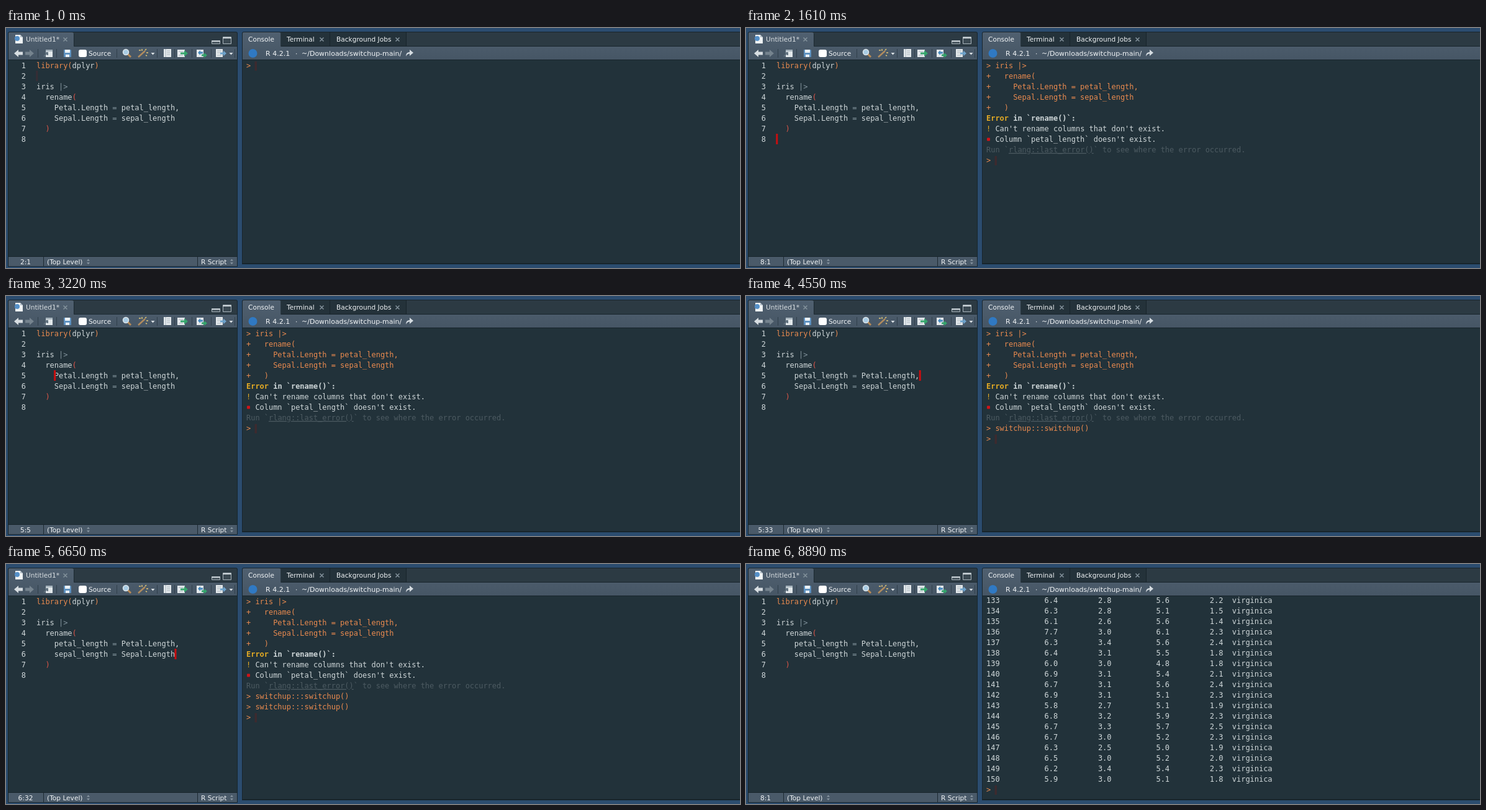
These frames come from a looping animation (1182 px wide and 388 px high, 9.24 s). An HTML page:

```html
<!DOCTYPE html>
<html lang="en">
<head>
<meta charset="utf-8">
<title>Renaming columns</title>
<style>
html, body { margin: 0; width: 100%; height: 100%; overflow: hidden; background: #2b4c6f; }
svg { display: block; }
text { white-space: pre; }
.ui { font: 10.6px "DejaVu Sans", sans-serif; fill: #f1f4f6; }
.code { font: 11.96px "DejaVu Sans Mono", monospace; fill: #cfd7d9; }
.o { fill: #e98a4f; } .r { fill: #dc5548; } .g { fill: #82939c; }
.y { fill: #e3aa24; } .d { fill: #4d5b62; } .b { font-weight: bold; }
.u { text-decoration: underline dotted; text-underline-offset: 2px; }
</style>
</head>
<body>
<svg width="1182" height="388" viewBox="0 0 1182 388">
  <defs>
    <linearGradient id="bar" x2="0" y2="1"><stop stop-color="#506070"/><stop offset="1" stop-color="#465665"/></linearGradient>
    <clipPath id="view"><path d="M381 52H1182V380H381Z"/></clipPath>
  </defs>
  <rect width="1182" height="388" fill="#2b4c6f"/>

  <!-- editor pane -->
  <path d="M3 9Q3 6 6 6H370Q373 6 373 9V386H3Z" fill="#18252c"/>
  <path d="M4 9Q4 7 6 7H370Q372 7 372 9V30H4Z" fill="#2c3a43"/>
  <path d="M4 30V9Q4 7 6 7H106Q109 7 109 10V30H372V51H4Z" fill="url(#bar)"/>
  <path d="M109.500 9V29.500H372" fill="none" stroke="#1c2a32"/>
  <path d="M4 52H372V369H4Z" fill="#22323a"/>
  <path d="M4 370H372V385H4Z" fill="#4a5a69"/>
  <path d="M60.500 370V385M308.500 370V385" stroke="#1c2a32"/>

  <!-- console pane -->
  <path d="M380 9Q380 6 383 6H1182V382H380Z" fill="#18252c"/>
  <path d="M381 9Q381 7 383 7H1182V30H381Z" fill="#2c3a43"/>
  <path d="M443 7H644V30H443Z" fill="#24323a"/>
  <path d="M521.500 7V30M644.500 7V30M443 29.500H1182" stroke="#17242b"/>
  <path d="M381 30V9Q381 7 383 7H440Q442 7 442 9V30H1182V51H381Z" fill="url(#bar)"/>
  <path d="M381 52H1182V380H381Z" fill="#22323a"/>

  <!-- tabs and labels -->
  <path d="M15 11H23L27 15V25H15Z" fill="#eef2f4"/><path d="M23 11V15H27" fill="#b2bec8"/>
  <circle cx="18" cy="17" r="4" fill="#5590c8"/>
  <g class="ui">
    <text x="32" y="22" fill-opacity=".85">Untitled1*</text>
    <text x="390" y="22">Console</text><text x="452" y="22">Terminal</text><text x="532" y="22">Background Jobs</text>
    <text x="133" y="45">Source</text>
    <text x="418" y="45" font-size="11">R 4.2.1</text><text x="466" y="45">·</text>
    <text x="476" y="45" style="font-size:11px">~/Downloads/switchup-main/</text>
    <text x="66" y="382">(Top Level)</text><text x="314" y="382">R Script</text>
    <text id="pos" x="31.500" y="382" text-anchor="middle"></text>
  </g>
  <path d="M92.500 15.500l6 6m0-6l-6 6M505.500 15.500l6 6m0-6l-6 6M627.500 15.500l6 6m0-6l-6 6" stroke="#82919b" stroke-width="1.500"/>
  <path d="M331.500 20.500h13v5h-13zM349.500 14.500h13v11h-13z" fill="#3b4952" stroke="#a9b4bb"/>
  <path d="M331 21.500h14M349 16h14" stroke="#c4ccd1" stroke-width="2"/>
  <path d="M130 376.500l2.500-3 2.500 3zM130 379l2.500 3 2.500-3zM361 376.500l2.500-3 2.500 3zM361 379l2.500 3 2.500-3z" fill="#8997a2"/>

  <!-- toolbar -->
  <path d="M51.500 34V48M81.500 34V48M178.500 34V48M243.500 34V48M271.500 34V48M299.500 34V48M330.500 34V48M368.500 34V48" stroke="#303f4b"/>
  <path d="M13 41l7-6v3.500h7v5h-7V47z" fill="#d8dee2"/>
  <path d="M45 41l-7-6v3.500h-7v5h7V47z" fill="#75838e"/>
  <path d="M64 35H75V47H64Z" fill="#e2e8eb"/><path d="M64 35H75V38H64Z" fill="#a9b6bf"/>
  <path d="M61 46l6-6m-4 0h4v4" fill="none" stroke="#60717e" stroke-width="2"/>
  <path d="M93 35H104L105 36V47H93Z" fill="#5f92c0"/><path d="M95 35H103V40H95ZM96 43H102V47H96Z" fill="#eaf1f6"/>
  <rect x="117" y="35" width="13" height="12" rx="3" fill="#fff"/>
  <path d="M196 42l5 5" stroke="#b98a55" stroke-width="3"/>
  <circle cx="193" cy="39" r="4.500" fill="#a9cce4" stroke="#dce4e8" stroke-width="1.500"/>
  <path d="M213 47L224 37" stroke="#b08b5e" stroke-width="2.500"/>
  <path d="M214 36h3M219 34v3M226 34l-2 2M226 40h3M225 44l2 1" stroke="#e2c675" stroke-width="1.500"/>
  <path d="M233.500 40h6l-3 3.500zM359.500 40h6l-3 3.500z" fill="#dce2e6"/>
  <path d="M254 34H266V47H254Z" fill="#e4e9ec"/><path d="M257 34V47M259 37H264M259 40H264M259 43H264" stroke="#a6b3bc"/>
  <path d="M276 35H288V47H276Z" fill="#e4e9ec"/><path d="M278 38H286M278 44H285" stroke="#a9b5bd"/>
  <path d="M281 39.500h6V36l6 5-6 5v-3.500h-6z" fill="#35a56c"/>
  <path d="M307 35H318V47H307Z" fill="#e4e9ec"/>
  <path d="M309 40l4-4v2.500h4v3h-4V44z" fill="#4689bd"/><path d="M315 42.500h4V40l5 4-5 4v-2.500h-4z" fill="#35a56c"/>
  <path d="M338 34H349V47H338Z" fill="#e4e9ec"/><path d="M340 37H347M340 40H345M340 44H347" stroke="#a9b5bd"/>
  <path d="M345 39.500h5V36.500l5 4.500-5 4.500v-3h-5z" fill="#6da2cb"/>
  <circle cx="397.500" cy="41" r="7" fill="#3079c3"/>
  <path d="M644 46q0-7 6-7v-4l6 5-6 5v-3.500q-4 0-6 4.500z" fill="#d5dce1"/>

  <g id="editor" class="code"></g>
  <g id="match" fill="none" stroke="#61737d"><path d="M63.500 154.500h7v16h-7zM106.500 103.500h7v16h-7z"/></g>
  <rect id="caret" width="3" height="17" fill="#c80e10"/>
  <g clip-path="url(#view)">
    <g id="console" class="code"></g>
    <rect id="wait" width="3.500" height="15" fill="#3d2a2f"/>
  </g>
</svg>
<script>
const LOOP = 9240, CH = 7.2, ROW = 17, TOP = 65;
const $ = id => document.getElementById(id);
const esc = s => s.replace(/&/g, "&amp;").replace(/</g, "&lt;").replace(/>/g, "&gt;");

// A line is a list of "classes|text" spans.
const span = s => {
  const i = s.indexOf("|");
  return `<tspan class="${s.slice(0, i)}">${esc(s.slice(i + 1))}</tspan>`;
};
const rows = (lines, x, top) => lines.map((l, i) =>
  `<text x="${x}" y="${top + i * ROW}">${l.map(span).join("")}</text>`).join("");

const pair = (name, swap) => {
  const p = [name[0].toUpperCase() + name.slice(1) + ".Length", name + "_length"];
  return swap ? p.reverse() : p;
};
const assign = (name, swap, end) => {
  const [a, b] = pair(name, swap);
  return ["|    " + a, "g| = ", "|" + b + end];
};
const script = (p, s) => [
  ["o|library(", "|dplyr", "o|)"], [],
  ["|iris ", "g||>"],
  ["|  rename", "r|("],
  assign("petal", p, ","), assign("sepal", s, ""),
  ["r|  )"], []
];

const input = s => ["o|" + s];
const IRIS = input("> iris |>"), SWITCH = input("> switchup:::switchup()"), PROMPT = input("> ");
const FAILED = [
  IRIS, input("+   rename("),
  input("+     Petal.Length = petal_length,"),
  input("+     Sepal.Length = sepal_length"),
  input("+   )"),
  ["y b|Error", "b| in `rename()`:"],
  ["y|!", "| Can't rename columns that don't exist."],
  ["|  Column `petal_length` doesn't exist."],
  ["d|Run `", "d u|rlang::last_error()", "d|` to see where the error occurred."]
];
// Each group holds the four measurements of a flower, in tenths.
const FLOWERS = ("64285622 63285115 61265614 77306123 63345624 64315518 60304818 69315421 67315624 " +
  "69315123 58275119 68325923 67335725 67305223 63255019 65305220 62345423 59305118").split(" ");
const TABLE = FLOWERS.map((f, i) => ["|" + (133 + i) + f.match(/../g).map((v, k) =>
  (v[0] + "." + v[1]).padStart(k % 2 ? 12 : 13)).join("") + "  virginica"]);

const SCREENS = [
  [PROMPT], [IRIS, []],
  [...FAILED, PROMPT],
  [...FAILED, SWITCH, PROMPT],
  [...FAILED, SWITCH, SWITCH, PROMPT],
  [...FAILED, SWITCH, SWITCH, IRIS, []],
  [...TABLE, PROMPT]
];

// Changes in time; each entry updates the state before it.
const STEPS = [
  [0, { row: 2, col: 1, on: 0.12, match: 0, petal: 0, sepal: 0, screen: 0 }],
  [280, { row: 7, col: 4, on: 1 }],
  [350, { match: 1 }],
  [770, { on: 0.4 }], [840, { on: 0 }],
  [1330, { on: 1 }],
  [1540, { row: 8, col: 1, match: 0, screen: 1 }],
  [1610, { screen: 2 }],
  [2170, { on: 0 }],
  [2310, { row: 7, on: 1 }], [2380, { row: 6 }], [2520, { row: 5 }],
  [2730, { col: 3 }], [3220, { col: 5 }],
  [3850, { on: 0.4 }], [3920, { on: 0 }],
  [4270, { on: 0.6 }], [4340, { on: 1 }],
  [4550, { col: 33, petal: 1, screen: 3 }],
  [4970, { on: 0.4 }], [5040, { on: 0 }],
  [5530, { row: 6, col: 32, on: 1 }],
  [6160, { on: 0 }],
  [6300, { on: 1, sepal: 1, screen: 4 }],
  [7070, { on: 0 }], [7490, { on: 1 }],
  [7700, { row: 7, col: 4 }], [7770, { match: 1 }],
  [8190, { row: 8, col: 1, match: 0, screen: 5 }],
  [8260, { screen: 6 }],
  [8890, { on: 0 }]
];

const shown = {};
function fill(id, key, html) {
  if (shown[id] === key) return;
  shown[id] = key;
  $(id).innerHTML = html();
}
function place(el, x, y) {
  el.setAttribute("x", x);
  el.setAttribute("y", y);
}

function draw(t) {
  const s = Object.assign({}, ...STEPS.filter(e => e[0] <= t).map(e => e[1]));
  const numbers = Array.from({ length: 8 }, (_, i) => ["|" + (i + 1)]);
  fill("editor", `${s.petal}${s.sepal}`, () =>
    rows(numbers, 24.8, TOP) + rows(script(s.petal, s.sepal), 49, TOP));

  const lines = SCREENS[s.screen], top = s.screen === 6 ? TOP - 2 : TOP;
  const failed = s.screen > 1 && s.screen < 6;
  fill("console", s.screen, () => rows(lines, 387, top) +
    (failed ? '<rect x="388" y="177.500" width="5" height="5" rx="1" fill="#d01318"/>' : ""));
  const last = lines.length - 1;
  place($("wait"), lines[last].length ? 400.5 : 385.5, top + last * ROW - 11);

  place($("caret"), 48.3 + (s.col - 1) * CH, TOP - 13 + (s.row - 1) * ROW);
  $("caret").setAttribute("opacity", s.on);
  $("match").setAttribute("opacity", s.match);
  $("pos").textContent = s.row + ":" + s.col;
}

const start = performance.now();
function tick() {
  draw((performance.now() - start) % LOOP);
  requestAnimationFrame(tick);
}
tick();
</script>
</body>
</html>
```
